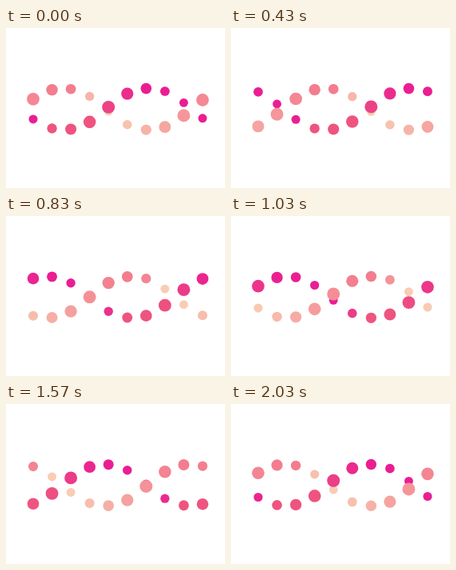
Animation of 274x200 px, one loop 2.07 s. Source, as an HTML page with a canvas:

```html
<!DOCTYPE html>
<html lang="en">
<head>
<meta charset="utf-8">
<title>Helix loader</title>
<style>
  html, body { margin: 0; width: 100%; height: 100%; overflow: hidden; background: #fff; }
  canvas { display: block; width: 274px; height: 200px; }
</style>
</head>
<body>
<canvas id="stage"></canvas>
<script>
const W = 274, H = 200, LOOP = 2070, STEPS = 62, TAU = 2 * Math.PI;
const COLUMNS = 10, LEFT = 34, GAP = 23.55, MID = 101.4, SWING = 26.7;
const COLUMN_LAG = 0.1103; // turns between neighbouring columns

// Each strand fades from one colour to another and back, once per turn
const FRONT = {
  side: 1, from: [243, 125, 142], to: [248, 205, 180],
  start: 0.85, rise: 0.6, end: 0.83, fall: 0.12
};
const BACK = {
  side: -1, from: [234, 30, 146], to: [238, 84, 127],
  start: 0.3, rise: 0.28, end: 0.62, fall: 0.09
};

const canvas = document.getElementById("stage");
const ctx = canvas.getContext("2d");
const ratio = window.devicePixelRatio || 1;
canvas.width = W * ratio;
canvas.height = H * ratio;
ctx.scale(ratio, ratio);

const fract = v => v - Math.floor(v);
const clamp = v => Math.max(0, Math.min(1, v));

function colour(strand, turn) {
  const u = fract(turn - strand.start);
  const mix = Math.min(clamp(u / strand.rise), clamp((strand.end - u) / strand.fall));
  const rgb = strand.from.map((v, i) => Math.round(v + (strand.to[i] - v) * mix));
  return `rgb(${rgb.join(",")})`;
}

function dot(x, turn, strand) {
  const angle = turn * TAU;
  // A sine with slightly flattened crests
  const wave = Math.sin(angle) + 0.03 * Math.sin(3 * angle);
  const radius = 6.7 + strand.side * 1.3 * Math.cos(angle);
  ctx.fillStyle = colour(strand, turn);
  ctx.beginPath();
  ctx.arc(x, MID + strand.side * SWING * wave, radius, 0, TAU);
  ctx.fill();
}

function draw(ms) {
  const step = Math.min(STEPS - 1, Math.floor((ms + 3.4) * 0.03));
  const time = step / STEPS;
  // The rotation speeds up and slows down a little during the loop
  const spin = time - 0.0765 + 0.0125 * Math.sin(TAU * (time + 0.05));
  ctx.fillStyle = "#fff";
  ctx.fillRect(0, 0, W, H);
  for (let c = 0; c < COLUMNS; c++) {
    const x = LEFT + c * GAP;
    const turn = spin - c * COLUMN_LAG;
    const frontNear = Math.cos(turn * TAU) > 0;
    const order = frontNear ? [BACK, FRONT] : [FRONT, BACK];
    order.forEach(strand => dot(x, turn, strand));
  }
}

const start = performance.now();
function tick() {
  draw((performance.now() - start) % LOOP);
  requestAnimationFrame(tick);
}
tick();
</script>
</body>
</html>
```
